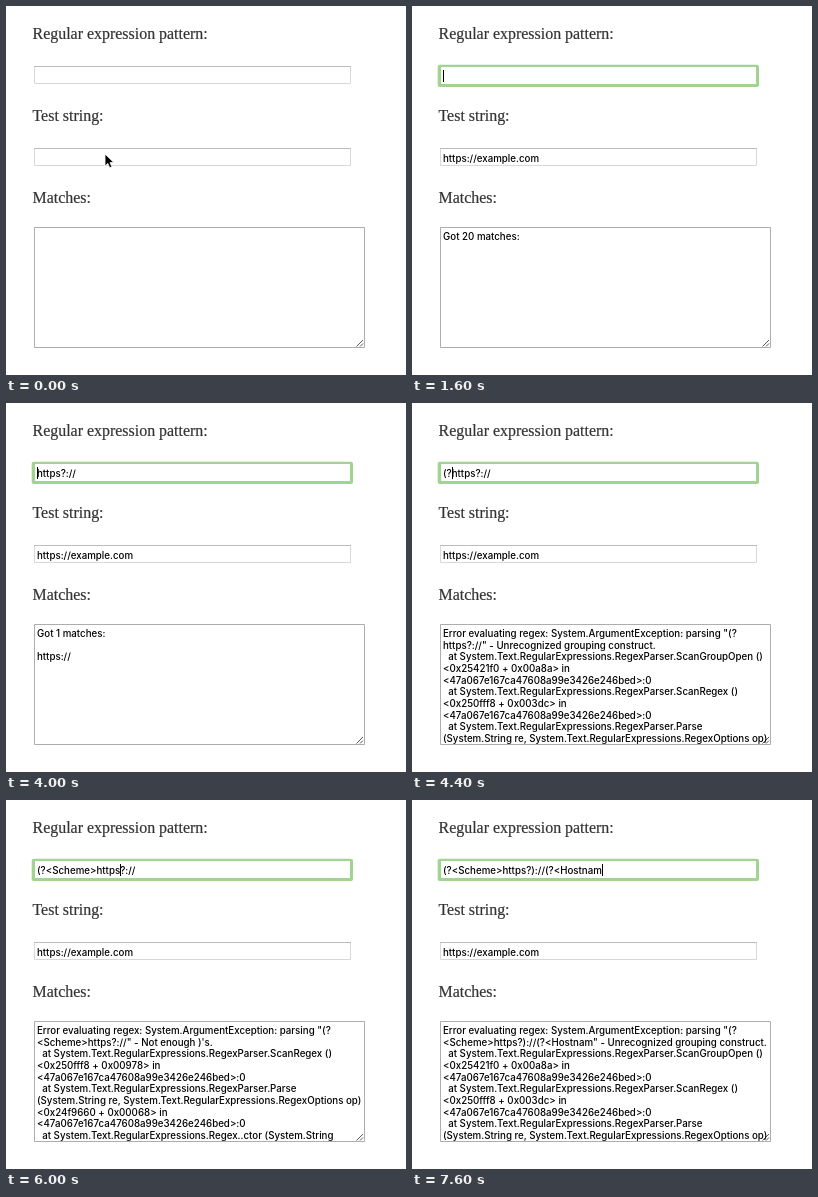
These frames come from a looping animation (400 by 369 pixels, 8000 ms). An HTML page:

```html
<!DOCTYPE html>
<html lang="en">
<head>
<meta charset="utf-8">
<title>Regex tester</title>
<style>
  html, body { margin: 0; width: 100%; height: 100%; overflow: hidden; background: #fff; }
  svg { display: block; width: 400px; height: 369px; }
  text { white-space: pre; }
  .label { font: 15.95px "Liberation Serif", "Times New Roman", serif; fill: #333; stroke: #333; stroke-width: .2; }
  .value { font: 500 9.72px Inter, "Open Sans", sans-serif; font-variant-ligatures: none; font-feature-settings: "calt" 0; fill: #000; }
  .box { fill: #fff; stroke: #d8d8d8; }
  .area { fill: #fff; stroke: #adadad; }
  .edge { stroke: #bcbcbc; }
</style>
</head>
<body>
<svg viewBox="0 0 400 369">
  <text class="label" x="26.5" y="33">Regular expression pattern:</text>
  <text class="label" x="26.5" y="115">Test string:</text>
  <text class="label" x="26.5" y="197">Matches:</text>

  <path class="box" d="M28.5 60.5h316v17h-316z"/>
  <path class="edge" d="M28 60.5h317"/>
  <path class="box" d="M28.5 142.5h316v17h-316z"/>
  <path class="edge" d="M28 142.5h317"/>
  <path class="area" d="M28.5 221.5h330v120h-330z"/>
  <path d="M350.500 340.500l6.500-6.500M354 340.500l3-3" stroke="#555" fill="none"/>

  <g id="ring">
    <rect x="25.700" y="58.700" width="321.300" height="22.400" rx="2" fill="#a0d490"/>
    <rect x="29" y="61" width="315" height="17" fill="#fff"/>
  </g>
  <text id="pattern" class="value" x="31" y="74"></text>
  <text id="test" class="value" x="31" y="156"></text>
  <g id="output"></g>
  <rect id="caret" width="1" height="12"/>

  <path id="arrow" d="M99 148v12l2.800-2.600 1.900 4.400 2.200-1-1.900-4.200h3.800z" fill="#000" stroke="#fff" stroke-width=".8"/>
  <path id="beam" d="M96 137.500h2l1 1 1-1h2M99 138v14M96 152.500h2l1-1 1 1h2" fill="none" stroke="#333"/>
</svg>
<script>
const LOOP = 8000;
const URL_TEXT = "https://example.com";
const HASH = "<47a067e167ca47608a99e3426e246bed>:0";
const PARSER = "  at System.Text.RegularExpressions.RegexParser.";
const SIGNATURE = "(System.String re, System.Text.RegularExpressions.RegexOptions op)";
const el = id => document.getElementById(id);

const got = (n, hit) => hit ? [`Got ${n} matches:`, "", hit] : [`Got ${n} matches:`];

const failure = (pattern, reason) => [
  'Error evaluating regex: System.ArgumentException: parsing "(?',
  `${pattern.slice(2)}" - ${reason}.`
];

const badGroup = pattern => [
  ...failure(pattern, "Unrecognized grouping construct"),
  PARSER + "ScanGroupOpen ()", "<0x25421f0 + 0x00a8a> in", HASH,
  PARSER + "ScanRegex ()", "<0x250fff8 + 0x003dc> in", HASH,
  PARSER + "Parse", SIGNATURE
];

const unclosed = pattern => [
  ...failure(pattern, "Not enough )'s"),
  PARSER + "ScanRegex ()", "<0x250fff8 + 0x00978> in", HASH,
  PARSER + "Parse", SIGNATURE, "<0x24f9660 + 0x00068> in", HASH,
  "  at System.Text.RegularExpressions.Regex..ctor (System.String"
];

const typeTest = (at, length) => ({
  at, focus: "test", test: URL_TEXT.slice(0, length), pattern: "",
  caret: length, lines: got(length + 1)
});

// A "|" in the typed text marks a visible caret.
function typePattern(at, typed, result) {
  const pattern = typed.replace("|", "");
  const lines = typeof result === "function" ? result(pattern) : result;
  return { at, focus: "pattern", test: URL_TEXT, pattern, caret: typed.indexOf("|"), lines };
}

const idle = (at, pointer) => ({ at, pointer, test: "", pattern: "", caret: -1, lines: [] });

const steps = [
  idle(0, "arrow"),
  idle(400, "beam"),
  typeTest(800, 7),
  typeTest(1200, 14),
  typePattern(1600, "|", got(20)),
  typePattern(2000, "htt|", got(1, "htt")),
  typePattern(2400, "http|", got(1, "http")),
  typePattern(2800, "https?", got(1, "https")),
  typePattern(3600, "https?://", got(1, "https://")),
  typePattern(4000, "|https?://", got(1, "https://")),
  typePattern(4400, "(?|https?://", badGroup),
  typePattern(4800, "(?<Sch|https?://", badGroup),
  typePattern(5200, "(?<Scheme>|https?://", unclosed),
  typePattern(5600, "(?<Scheme>ht|tps?://", unclosed),
  typePattern(6000, "(?<Scheme>https|?://", unclosed),
  typePattern(6400, "(?<Scheme>https?)|://", got(1, "https://")),
  typePattern(6800, "(?<Scheme>https?)://|", got(1, "https://")),
  typePattern(7200, "(?<Scheme>https?)://(?<Hos|", badGroup),
  typePattern(7600, "(?<Scheme>https?)://(?<Hostnam|", badGroup)
];

const rows = Array.from({ length: 10 }, (_, i) => {
  const row = document.createElementNS("http://www.w3.org/2000/svg", "text");
  row.setAttribute("class", "value");
  row.setAttribute("x", 31);
  row.setAttribute("y", Math.round(234 + i * 11.67));
  return el("output").appendChild(row);
});

const show = (id, on) => el(id).setAttribute("visibility", on ? "visible" : "hidden");

function render(step) {
  el("pattern").textContent = step.pattern;
  el("test").textContent = step.test;
  rows.forEach((row, i) => row.textContent = step.lines[i] || "");

  show("arrow", step.pointer === "arrow");
  show("beam", step.pointer === "beam");
  show("ring", step.focus);
  show("caret", step.caret >= 0);

  const shift = step.focus === "test" ? 82 : 0;
  el("ring").setAttribute("transform", `translate(0 ${shift})`);
  if (step.caret >= 0) {
    const width = step.caret ? el(step.focus).getSubStringLength(0, step.caret) : 0;
    el("caret").setAttribute("x", Math.round(31 + width));
    el("caret").setAttribute("y", 64 + shift);
  }
}

let current;
function tick() {
  const time = performance.now() % LOOP;
  const step = steps.findLast(s => s.at <= time);
  if (step !== current) render(current = step);
  requestAnimationFrame(tick);
}
tick();
</script>
</body>
</html>
```
